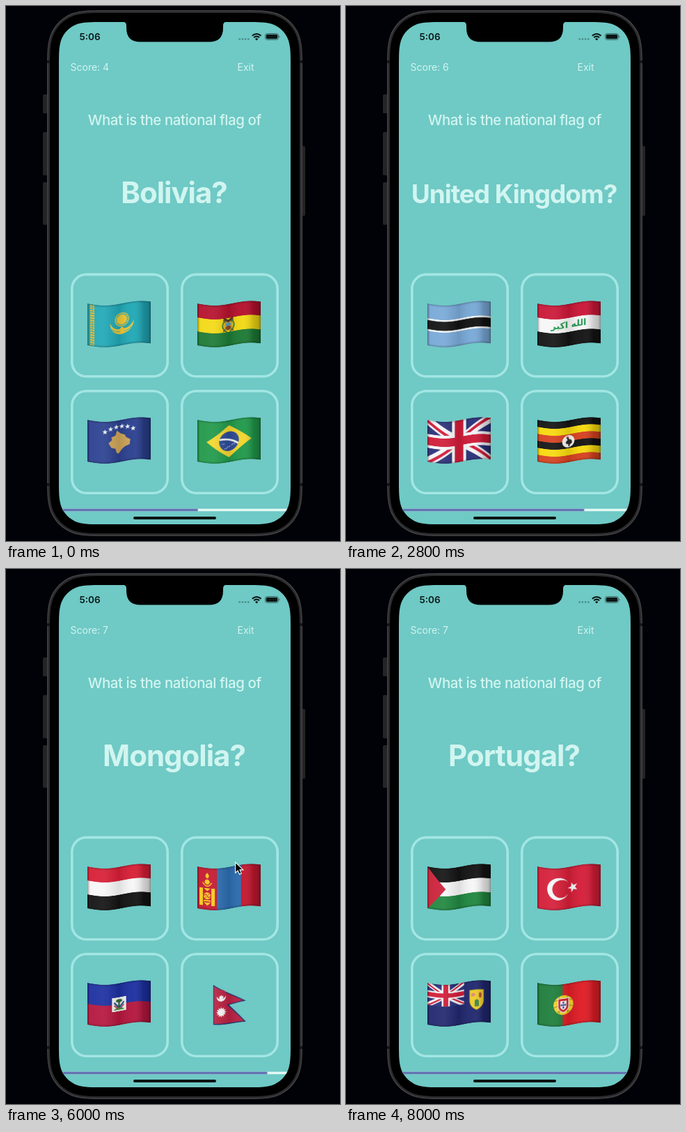
An HTML page with a canvas for the animation above (8800 ms loop, 480 by 768 pixels).

```html
<!DOCTYPE html>
<html lang="en">
<head>
<meta charset="utf-8">
<title>Flag quiz</title>
<style>
html, body { margin: 0; width: 100%; height: 100%; overflow: hidden; background: #010207; }
svg, canvas { position: absolute; left: 0; top: 0; }
text { font-family: Inter, Roboto, sans-serif; fill: #d1f5f0; }
.small { font-size: 14px; }
.ask { font-size: 20.5px; font-weight: 500; letter-spacing: -.45px; text-anchor: middle; }
.title { font-size: 42px; font-weight: 700; letter-spacing: -.024em; text-anchor: middle; }
.long { font-size: 37px; letter-spacing: -.028em; }
.clock { font-size: 13.5px; font-weight: 600; fill: #0a1615; }
.cells { fill: none; stroke: #a2e6e3; stroke-width: 3.6; }
.ok { fill: #14fc04; }
.bad { fill: #e60202; }

.s1, .s2, .s3, .s4, .s5, .hit, .bar, .cursor { animation: 8.8s step-end infinite; }
.s1 { animation-name: s1; }
.s2 { animation-name: s2; }
.s3 { animation-name: s3; }
.s4 { animation-name: s4; }
.s5 { animation-name: s5; }
.s1 .hit { animation-name: hit1; }
.s2 .hit { animation-name: hit2; }
.s3 .hit { animation-name: hit3; }
.s4 .hit { animation-name: hit4; }
.bar { animation-name: bar; transform-origin: 76px 0; }
.cursor { animation-name: cursor; }

@keyframes s1 { 0% { opacity: 1 } 6.81%, to { opacity: 0 } }
@keyframes s2 { 0% { opacity: 0 } 6.81% { opacity: 1 } 31.81%, to { opacity: 0 } }
@keyframes s3 { 0% { opacity: 0 } 31.81% { opacity: 1 } 61.36%, to { opacity: 0 } }
@keyframes s4 { 0% { opacity: 0 } 61.36% { opacity: 1 } 86.36%, to { opacity: 0 } }
@keyframes s5 { 0% { opacity: 0 } 86.36%, to { opacity: 1 } }

@keyframes hit1 { 0% { opacity: 0 } 2.27% { opacity: .6 } 3.4%, to { opacity: 1 } }
@keyframes hit2 { 0% { opacity: 0 } 28.4%, to { opacity: 1 } }
@keyframes hit3 { 0% { opacity: 0 } 56.81% { opacity: .6 } 57.95%, to { opacity: 1 } }
@keyframes hit4 { 0% { opacity: 0 } 82.95% { opacity: .6 } 84.09%, to { opacity: 1 } }

@keyframes bar {
  0% { transform: scaleX(.6) }
  6.81% { transform: scaleX(.7) }
  31.81% { transform: scaleX(.8) }
  61.36% { transform: scaleX(.9) }
  86.36% { transform: scaleX(.95) }
  87.49%, to { transform: scaleX(1) }
}
@keyframes cursor {
  0% { opacity: 0; transform: translate(321px, 471px) }
  39.77% { opacity: 1; transform: translate(321px, 471px) }
  45.45% { opacity: 1; transform: translate(319px, 468px) }
  48.86% { opacity: 1; transform: translate(316px, 464px) }
  56.81% { opacity: 0; transform: translate(329px, 420px) }
  68.18% { opacity: 1; transform: translate(329px, 420px) }
  72.72% { opacity: 1; transform: translate(316px, 466px) }
  79.54% { opacity: 1; transform: translate(311px, 467px) }
  82.95%, to { opacity: 0; transform: translate(311px, 467px) }
}
</style>
</head>
<body>
<svg width="480" height="768" viewBox="0 0 480 768">
  <defs>
    <rect id="cell" width="137.4" height="146.4" rx="20.5"/>
    <path id="glass" data-box="76 23 333 721 41.5"/>
    <clipPath id="screen"><use href="#glass"/></clipPath>
  </defs>

  <!-- phone body -->
  <g fill="#242426">
    <rect x="53" y="127" width="8" height="27" rx="1.5"/>
    <rect x="53" y="181" width="8" height="62" rx="1.5"/>
    <rect x="53" y="253" width="8" height="61" rx="1.5"/>
    <rect x="424" y="201" width="6" height="100" rx="1.5"/>
  </g>
  <path data-box="59 6 367 755 58" fill="#424244"/>
  <path data-box="60.5 7.5 364 752 56.5" fill="#2a2a2c"/>
  <path d="M59 80h4M59 687h4M422 80h4M422 687h4" stroke="#161618" stroke-width="4"/>
  <path data-box="63 10 359 747 54" fill="#000"/>
  <use href="#glass" fill="#6fc9c5"/>
  <path d="M168 22.5q5 .5 5 5.5v3.500q0 20 20 20h99q20 0 20-20v-3.500q0-5 5-5.500z" fill="#000"/>

  <!-- status bar -->
  <text class="clock" x="105.5" y="49">5:06</text>
  <path d="M334.5 47.500h16" stroke="#468481" stroke-width="2.2" stroke-dasharray="2.5 1.7"/>
  <g fill="none" stroke="#0a1615">
    <path d="M353.8 42.800q6.400-5.600 12.800 0M356.200 45.300q4-3.400 8 0" stroke-width="2"/>
    <rect x="372.5" y="39.5" width="19" height="9" rx="2.8" opacity=".5"/>
  </g>
  <path d="M358 47.200q2.200-1.800 4.400 0l-2.200 2.300zM392.700 42.300q1.500 1.700 0 3.400z" fill="#0a1615"/>
  <rect x="373.7" y="40.7" width="16.6" height="6.6" rx="1.7" fill="#0a1615"/>

  <text class="small" x="332.5" y="92.5">Exit</text>
  <text class="ask" x="242.3" y="171">What is the national flag of</text>

  <g class="s1">
    <use class="hit ok" href="#cell" x="252.8" y="385.4"/>
    <text class="small" x="92.5" y="92.5">Score: 4</text>
    <text class="title" x="241.5" y="283">Bolivia?</text>
  </g>
  <g class="s2">
    <use class="hit ok" href="#cell" x="252.8" y="552.8"/>
    <text class="small" x="92.5" y="92.5">Score: 5</text>
    <text class="title" x="241.5" y="283">Guyana?</text>
  </g>
  <g class="s3">
    <use class="hit ok" href="#cell" x="94.8" y="552.8"/>
    <text class="small" x="92.5" y="92.5">Score: 6</text>
    <text class="title long" x="241.5" y="283">United Kingdom?</text>
  </g>
  <g class="s4">
    <use class="hit ok" href="#cell" x="252.8" y="385.4"/>
    <use class="hit bad" href="#cell" x="252.8" y="552.8"/>
    <text class="small" x="92.5" y="92.5">Score: 7</text>
    <text class="title" x="241.5" y="283">Mongolia?</text>
  </g>
  <g class="s5">
    <text class="small" x="92.5" y="92.5">Score: 7</text>
    <text class="title" x="241.5" y="283">Portugal?</text>
  </g>

  <g class="cells">
    <use href="#cell" x="94.8" y="385.4"/>
    <use href="#cell" x="252.8" y="385.4"/>
    <use href="#cell" x="94.8" y="552.8"/>
    <use href="#cell" x="252.8" y="552.8"/>
  </g>

  <g clip-path="url(#screen)">
    <rect x="76" y="721.7" width="333" height="3.5" fill="#e3f7f3"/>
    <rect class="bar" x="76" y="721.7" width="333" height="3.5" fill="#6473b3"/>
  </g>
  <rect x="183" y="733" width="119" height="4" rx="2" fill="#0a1413"/>
</svg>

<canvas class="s1" width="480" height="768" data-flags="kz bo xk br"></canvas>
<canvas class="s2" width="480" height="768" data-flags="xk bf gq gy"></canvas>
<canvas class="s3" width="480" height="768" data-flags="bw iq gb ug"></canvas>
<canvas class="s4" width="480" height="768" data-flags="ye mn ht np"></canvas>
<canvas class="s5" width="480" height="768" data-flags="ps tr tc pt"></canvas>

<svg width="480" height="768" viewBox="0 0 480 768">
  <path class="cursor" d="M.7 1v15.200l3.500-3.300 2.400 5.400 2.700-1.200-2.300-5.200h4.900z" fill="#000" stroke="#fff" stroke-width="1.1"/>
</svg>

<script>
// Rounded box whose corners ease in and out of the straight sides
const curve = [[1.529, 0], [1.089, 0], [.868, 0], [.632, .075], [.373, .169],
               [.169, .373], [.075, .632], [0, .868], [0, 1.089], [0, 1.529]];
function smoothBox(x, y, w, h, r) {
  const corner = (cx, cy, sx, sy) => {
    const pts = curve.map(([u, v]) => [cx + sx * u * r, cy + sy * v * r]);
    if (sx !== sy) pts.reverse();
    return `${pts[0]}C${pts.slice(1).join(' ')}`;
  };
  return 'M' + [corner(x, y, 1, 1), corner(x, y + h, 1, -1),
                corner(x + w, y + h, -1, -1), corner(x + w, y, -1, 1)].join('L') + 'Z';
}
for (const el of document.querySelectorAll('[data-box]'))
  el.setAttribute('d', smoothBox(...el.dataset.box.split(' ').map(Number)));

const W = 90, H = 60;
let g; // context of the flag being painted

const rect = (color, x, y, w, h) => { g.fillStyle = color; g.fillRect(x, y, w, h); };
const base = color => rect(color, 0, 0, W, H);
const bands = (...colors) => colors.forEach((c, i) =>
  rect(c, 0, i * H / colors.length, W, H / colors.length));
const disc = (color, x, y, rx, ry = rx) => {
  g.fillStyle = color;
  g.beginPath();
  g.ellipse(x, y, rx, ry, 0, 0, 7);
  g.fill();
};
const fill = (color, d) => { g.fillStyle = color; g.fill(new Path2D(d)); };
const line = (color, width, d, dash = []) => {
  g.strokeStyle = color;
  g.lineWidth = width;
  g.setLineDash(dash);
  g.stroke(new Path2D(d));
  g.setLineDash([]);
};
const star = (color, x, y, r, points = 5, inner = .4, turn = 0) => {
  g.fillStyle = color;
  g.beginPath();
  for (let i = 0; i < points * 2; i++) {
    const a = turn + i * Math.PI / points, d = i % 2 ? r * inner : r;
    g.lineTo(x + d * Math.sin(a), y - d * Math.cos(a));
  }
  g.fill();
};

const paint = {
  kz() {
    base('#20a8b6');
    line('#d9bb3c', 6, 'M7 1V59', [2.5, 1]);
    line('#8f9a45', 1.5, 'M7 1V59', [2, 2]);
    star('#efc935', 49, 23, 11, 22, .8);
    disc('#20a8b6', 49, 23, 8.3);
    disc('#efc935', 49, 23, 7.3);
    fill('#efc935', 'M32 26Q33 42 48 44Q65 42 66 26Q61 37 52 36L49 33L46 36Q37 37 32 26Z');
    line('#20a8b6', .7, 'M35 35Q40 40 46 40M63 35Q58 40 52 40');
  },
  bo() {
    bands('#b5102c', '#f3d914', '#1c7a34');
    line('#b5202c', 2, 'M37 22L51 39M51 22L37 39');
    line('#3f7d35', 2, 'M40 22Q31 32 42 40M48 22Q57 32 46 40');
    disc('#d8a52a', 44, 31, 6, 7);
    disc('#5b9bb5', 44, 29, 4, 3);
    disc('#8d4a2a', 44, 34, 4, 3);
    fill('#4b3320', 'M36 19Q42 20 44 23Q46 20 52 19Q49 24 44 26Q39 24 36 19Z');
  },
  xk() {
    base('#2b4090');
    fill('#cda458', 'M42 14L47 19L53 22L55 26L61 30L60 37L53 39L49 42L44 48L41 45L40 40L34 38L30 31L35 27L34 23L40 21Z');
    for (let i = 0; i < 6; i++) star('#f2f5fb', 25 + 8 * i, 9 + .95 * (i - 2.5) ** 2, 4);
  },
  br() {
    base('#20994a');
    fill('#f4d62c', 'M13 30L45 7L77 30L45 53Z');
    disc('#2d4a97', 45, 30, 14);
    line('#f1f5f5', 2.6, 'M31.5 26.500Q46 25 58 35');
    for (let i = 0; i < 12; i++) disc('#d5deed', 36 + i * 7 % 18, 33 + i * 5 % 8, .6);
  },
  bf() {
    bands('#cd2135', '#20a048');
    star('#f6d31f', 45, 30, 10.5);
  },
  gq() {
    bands('#3b9c25', '#f7f7f5', '#d6202f');
    fill('#2470b5', 'M0 0L26 30L0 60Z');
    fill('#c9cac7', 'M37 25H48V32Q48 37 42.500 38Q37 37 37 32Z');
    disc('#4d8b3c', 42.5, 29, 4, 2.8);
    line('#69502f', 1.5, 'M42.5 30V36');
    line('#b58b2b', 1.2, 'M36 23.500H49', [1.2, 1.1]);
    line('#8d8d88', 1, 'M37 39H48');
  },
  gy() {
    base('#20a04c');
    fill('#f5f7f2', 'M0 0L90 30L0 60Z');
    fill('#f5d22a', 'M0 3.500L81 30L0 56.500Z');
    fill('#111', 'M0 0L46 30L0 60Z');
    fill('#d0203a', 'M0 3.500L41 30L0 56.500Z');
  },
  bw() {
    base('#78a9d8');
    rect('#f3f6f8', 0, 21, W, 18);
    rect('#111', 0, 23.5, W, 13);
  },
  iq() {
    bands('#ca1636', '#f7f7f7', '#131313');
    g.fillStyle = '#179447';
    g.font = 'bold 12.5px "DejaVu Sans", sans-serif';
    g.textAlign = 'center';
    g.fillText('الله اكبر', 45, 34);
  },
  gb() {
    g.save();
    g.beginPath();
    g.rect(0, 0, W, H);
    g.clip();
    base('#2a3079');
    line('#f5f5f7', 12, 'M0 0L90 60M90 0L0 60');
    line('#d01a38', 4, 'M0 1.500L45 31.500M45 28.500L90 58.500M90 -1.500L45 28.500M45 31.500L0 61.500');
    line('#f5f5f7', 20, 'M45 0V60M0 30H90');
    line('#d01a38', 12, 'M45 0V60M0 30H90');
    g.restore();
  },
  ug() {
    bands('#131313', '#f7d90c', '#d6401f', '#131313', '#f7d90c', '#d6401f');
    disc('#f5f5f2', 44, 30, 8.7);
    fill('#2a2624', 'M41 24L44 23L45 27Q50 28 49 33L46 35V37H44V34Q39 33 41 30L43 28Z');
    disc('#c9402c', 43, 24, 1.3);
  },
  ye() { bands('#d81e36', '#f7f7f7', '#131313'); },
  mn() {
    base('#c4172f');
    rect('#2c6db0', 28, 0, 34, H);
    const gold = '#f5c81c', red = '#c4172f';
    fill(gold, 'M14 7Q19 12 14 15Q9 12 14 7Z');
    disc(gold, 14, 20, 3.6);
    line(gold, 1.5, 'M7.5 21Q14 31 20.500 21');
    rect(gold, 3, 29, 5, 25);
    rect(gold, 20, 29, 5, 25);
    fill(gold, 'M9 29H19L14 33Z');
    disc(gold, 14, 40, 5);
    line(red, 1, 'M9.5 40Q12 36 14 40T18.500 40');
    disc(red, 12, 42, .7);
    disc(red, 16, 38, .7);
    rect(gold, 9, 46, 10, 2);
    fill(gold, 'M9 49.500H19L14 54Z');
  },
  ht() {
    bands('#1c2fa0', '#b5163e');
    rect('#f3f3ee', 35, 20, 20, 20);
    fill('#4c9445', 'M37 38Q45 31 53 38Z');
    line('#2c4f92', 2.4, 'M38 27L44 34M52 27L46 34');
    line('#b02a42', 1.5, 'M38 31L43 36M52 31L47 36');
    line('#2f5f33', 2.2, 'M45 25V35');
    disc('#2f6b3a', 45, 25, 4.5, 2.4);
  },
  np() {
    fill('#24306e', 'M22.5 0L69 29L45 31L69 59L22.500 57.500Z');
    fill('#bb2142', 'M24 2.500L65 28L42 30L66 57.500L24 56Z');
    disc('#f7f7f7', 34, 18, 6.5);
    disc('#bb2142', 34, 14.5, 6.7);
    star('#f7f7f7', 34, 19, 3.8, 8, .65);
    star('#f7f7f7', 34, 40, 7.5, 12, .62);
  },
  ps() {
    bands('#131313', '#f7f7f7', '#20873f');
    fill('#cc2039', 'M0 0L26 30L0 60Z');
  },
  tr() {
    base('#d51d38');
    disc('#f7f7f7', 30, 30, 16);
    disc('#d51d38', 34, 30, 12.8);
    star('#f7f7f7', 50.5, 30, 7.5, 5, .4, -Math.PI / 2);
  },
  tc() {
    base('#20276e');
    g.save();
    g.scale(.58, .52);
    paint.gb();
    g.restore();
    fill('#f0cb2c', 'M60 13H80V29Q79 38 70 42Q61 38 60 29Z');
    disc('#d98a72', 65, 20, 3, 2.5);
    disc('#b54a33', 75, 21, 2, 4);
    fill('#3e8b46', 'M67 37V29Q70 25 73 29V37Z');
    line('#9a8a25', .7, 'M60 13H80V29Q79 38 70 42Q61 38 60 29Z');
  },
  pt() {
    base('#df1c25');
    rect('#1c7c3a', 0, 0, 36, H);
    disc('#f0d42a', 37, 30, 14);
    line('#8f8d2a', 1, 'M25 24Q37 18 49 24M24 33Q37 27 50 33M28 40Q37 35 46 40M31 18V42M43 18V42');
    fill('#f5f5f5', 'M29 20H45V33Q44 39 37 41Q30 39 29 33Z');
    fill('#d5202c', 'M30 21H44V33Q43 38 37 40Q31 38 30 33Z');
    fill('#f5f5f5', 'M32.5 24H41.500V32Q41 35.500 37 37Q33 35.500 32.500 32Z');
    for (const [x, y] of [[37, 26.5], [34.4, 30], [37, 30], [39.6, 30], [37, 33.5]])
      disc('#2a4b9c', x, y, 1.2, 1.5);
  }
};

// Cloth light and soft rim, kept inside the painted shape
function shade() {
  const light = g.createLinearGradient(0, 0, W, 0);
  const stops = [[0, 0, .2], [.06, 255, .05], [.25, 255, .08], [.5, 0, .1],
                 [.72, 255, .04], [.88, 0, .16], [1, 0, .28]];
  for (const [at, v, a] of stops) light.addColorStop(at, `rgba(${v},${v},${v},${a})`);
  g.globalCompositeOperation = 'source-atop';
  base(light);
  g.strokeStyle = 'rgba(0,0,0,.1)';
  for (const width of [2, 5]) {
    g.lineWidth = width;
    g.strokeRect(0, 0, W, H);
  }
}

// A clear unit above and below keeps the waved edges smooth
function flatFlag(code) {
  const cloth = document.createElement('canvas');
  cloth.width = W * 2;
  cloth.height = (H + 2) * 2;
  g = cloth.getContext('2d');
  g.scale(2, 2);
  g.translate(0, 1);
  paint[code]();
  shade();
  return cloth;
}

// Copy the flat flag column by column along a wave
function wave(ctx, cloth, x, y) {
  const cols = 91, step = cloth.width / cols;
  ctx.imageSmoothingQuality = 'high';
  for (let i = 0; i < cols; i++) {
    const u = i / cols, dy = 3 * Math.sin(1.8 * Math.PI * u) - u;
    ctx.drawImage(cloth, i * step, 0, step, cloth.height, x + i, y - 1 + dy, 1, H + 2);
  }
}

for (const canvas of document.querySelectorAll('canvas')) {
  const ctx = canvas.getContext('2d');
  canvas.dataset.flags.split(' ').forEach((code, i) =>
    wave(ctx, flatFlag(code), i % 2 ? 275 : 117, i < 2 ? 427.2 : 594.2));
}
</script>
</body>
</html>
```
